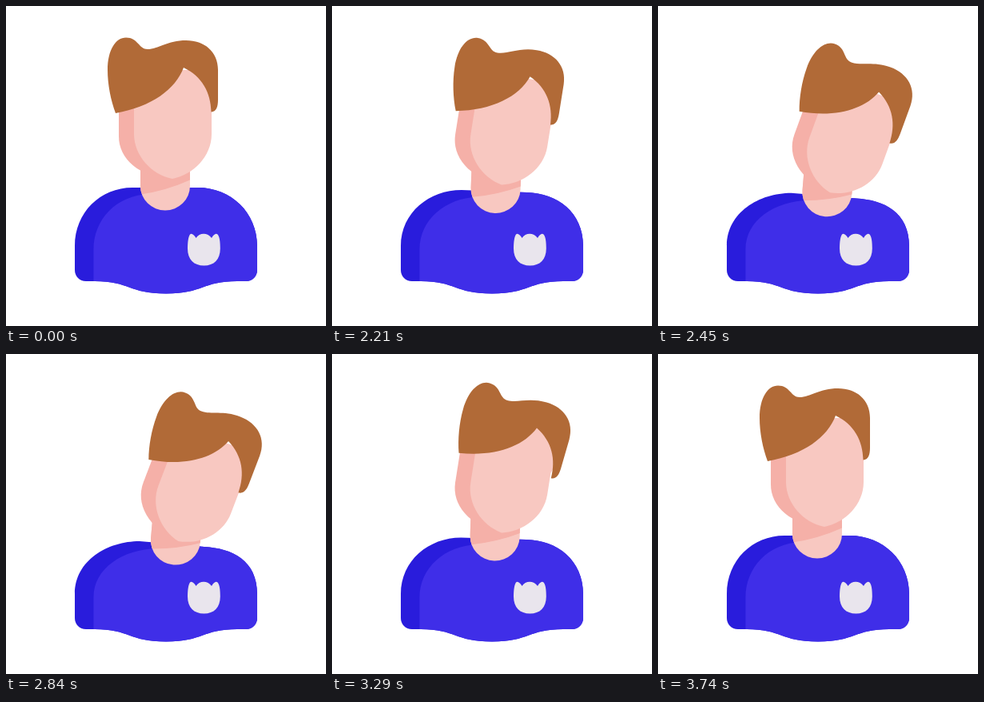
These frames come from a looping animation (400 px wide and 400 px high, 3.77 s). An HTML page with a canvas:

```html
<!DOCTYPE html>
<html lang="en">
<head>
<meta charset="utf-8">
<title>Tilting head</title>
<style>
html, body { margin: 0; width: 100%; height: 100%; overflow: hidden; background: #fff; }
canvas { display: block; width: 400px; height: 400px; }
</style>
</head>
<body>
<canvas id="stage" width="400" height="400"></canvas>
<script>
const ctx = document.getElementById('stage').getContext('2d');
const LOOP = 3770, STEP = 30, START = 2030, MOVE = 575;
const TILT = 20.9 * Math.PI / 180;
const NECK_TILT = 5 * Math.PI / 180;

const color = {
  shirt: '#3f2ee8', shirtDark: '#291cdc',
  skin: '#f8c8c1', skinDark: '#f5b0a8',
  hair: '#b16a37', badge: '#e9e5ed'
};

const shapes = {
  faceDark: 'M141 98V163C141 191 166 214 208 216L240 160V98Z',
  face: 'M160 90V160C160 187 182 211 208 216C234 211 257 188 257 160V133L261 122C261 105 245 85 235 80H190Z',
  hair: 'M137 134C131 118 127 98 127 80C127 55 137 39.5 150 39.5C165 39.5 166 54 177 54' +
        'C190 54 202 43 225 43C248 43 265 57 265 80V117C265 126 263 132 256.5 132.5' +
        'C256 108 245 88 222 77C212 104 182 126 137 134Z',
  badge: 'M227 303C227 295 228 288 230 285.5C232 283.5 235 286 237.5 290C242 283 252 283 257 290' +
         'C259.5 286 262 283.5 264.5 285.5C267 288 267.8 295 267.8 303C267.8 317 260 324.5 247.5 324.5' +
         'C235 324.5 227 317 227 303Z',
  neck: 'M168 195H230V225A31 30.5 0 0 1 168 225Z'
};
for (const k in shapes) shapes[k] = new Path2D(shapes[k]);

// Smooth ease, cubic-bezier(.4, 0, .4, 1)
function ease(u) {
  if (u <= 0) return 0;
  if (u >= 1) return 1;
  let lo = 0, hi = 1;
  for (let i = 0; i < 24; i++) {
    const s = (lo + hi) / 2;
    const x = 1.2 * s * (1 - s) + s * s * s;
    if (x < u) lo = s; else hi = s;
  }
  return lo * lo * (3 - 2 * lo);
}

const ramp = (t, from) => ease((t - from) / MOVE);

function turn(x, y, angle) {
  ctx.translate(x, y);
  ctx.rotate(angle);
  ctx.translate(-x, -y);
}

function fill(path, style) {
  ctx.fillStyle = style;
  ctx.fill(path);
}

// Writes points that move by (dx, dy) at full tilt
const mover = p => (x, y, dx, dy) => `${x + dx * p} ${y + dy * p} `;

function drawBody(p) {
  const pt = mover(p);
  const body = new Path2D(
    'M86 300C86 258 ' + pt(118, 227, 9, 7) + pt(158, 227, 9, 7) +
    'L' + pt(240, 227, 8, 14) +
    'C' + pt(281, 227, 2, 16) + '314 258 314 300' +
    'V330C314 338 308 344 300 344H289C245 344 247 359.5 200 359.5' +
    'C153 359.5 155 344 111 344H100C92 344 86 338 86 330Z');
  const front = new Path2D(
    'M109.5 365V304C109.5 268 ' + pt(137, 236, 9, 8) + pt(180, 235, 9, 8) +
    'L' + pt(205, 220, 9, 8) + 'H330V365Z');
  fill(body, color.shirtDark);
  ctx.save();
  ctx.clip(body);
  fill(front, color.shirt);
  ctx.restore();
}

function drawNeck(p) {
  const pt = mover(p);
  const shade = new Path2D(
    'M' + pt(160, 236, 13, 8) + 'L' + pt(168, 235.5, 13, 8) +
    'Q' + pt(200, 231, 13, 13) + pt(231, 217, 13, 19) +
    'L' + pt(240, 190, 13, 19) + 'L' + pt(160, 190, 13, 8) + 'Z');
  ctx.save();
  ctx.translate(10.3 * p, 8 * p);
  turn(199, 255, NECK_TILT * p);
  fill(shapes.neck, color.skin);
  ctx.clip(shapes.neck);
  ctx.setTransform(1, 0, 0, 1, 0, 0);
  fill(shade, color.skinDark);
  ctx.restore();
}

function drawHead(p, hairP) {
  ctx.save();
  turn(163, 245, TILT * p);
  fill(shapes.faceDark, color.skinDark);
  fill(shapes.face, color.skin);
  turn(204, 151, TILT * (hairP - p));
  fill(shapes.hair, color.hair);
  ctx.restore();
}

function draw(t) {
  let bodyP = 0, headP = 0, hairP = 0;
  if (t >= START) {
    const q = START + Math.floor((t - START) / STEP) * STEP;
    const out = ramp(q, 1985);
    // On the way back the body leads and the hair trails
    bodyP = out - ramp(q, 3003);
    headP = out - ramp(q, 3025);
    hairP = out - ramp(q, 3125);
  }
  ctx.fillStyle = '#fff';
  ctx.fillRect(0, 0, 400, 400);
  drawBody(bodyP);
  drawNeck(bodyP);
  drawHead(headP, hairP);
  fill(shapes.badge, color.badge);
}

const begin = performance.now();
function tick() {
  draw((performance.now() - begin) % LOOP);
  requestAnimationFrame(tick);
}
tick();
</script>
</body>
</html>
```
